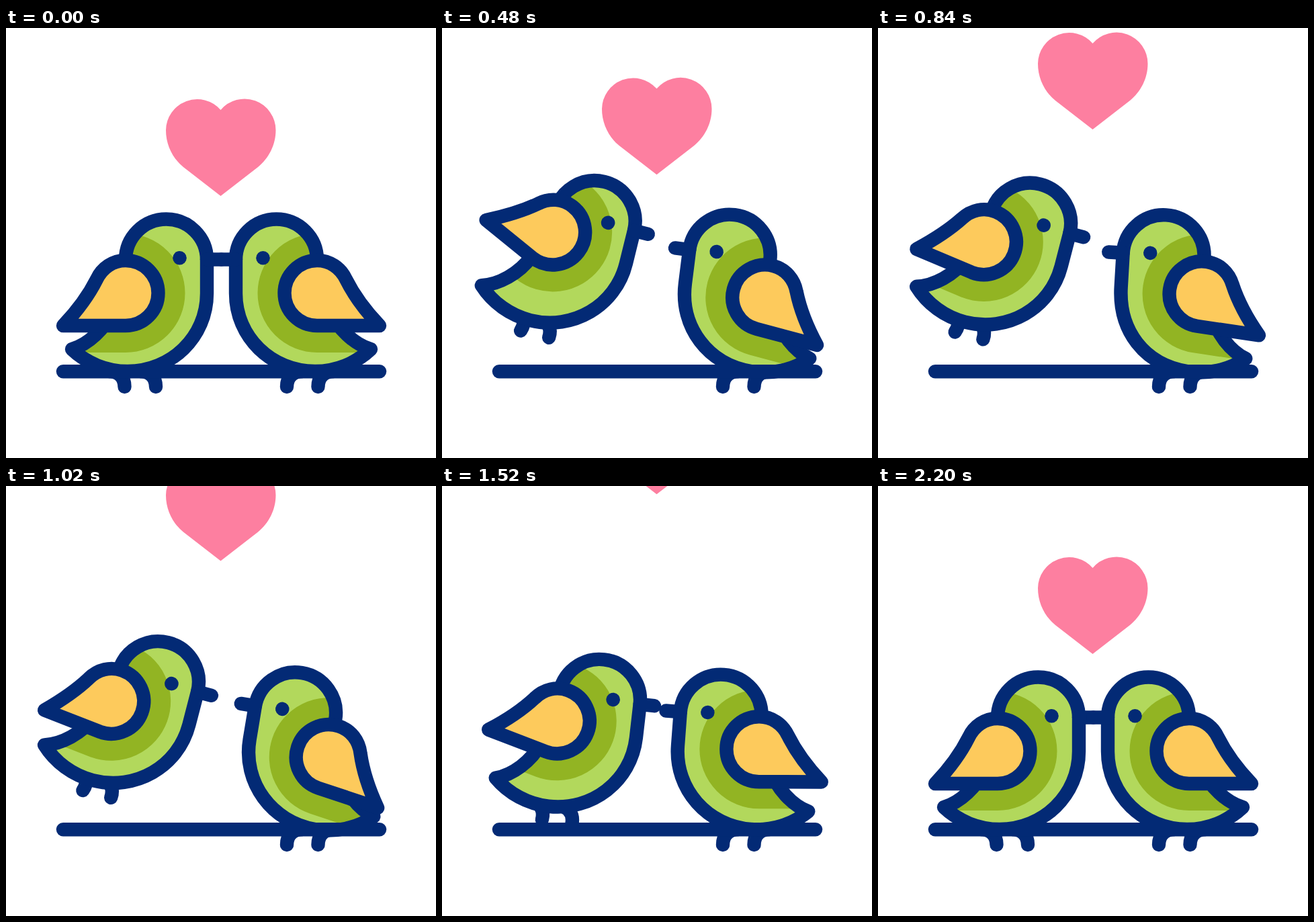
An HTML page for the animation above (2400 ms loop, 640 by 640 pixels).

```html
<!DOCTYPE html>
<html lang="en">
<head>
<meta charset="utf-8">
<title>Two birds</title>
<style>
  html, body { margin: 0; width: 100%; height: 100%; overflow: hidden; background: #fff; }
  svg { display: block; width: 100vw; height: 100vh; }
  .line { fill: none; stroke: #032a75; stroke-width: 20.4; stroke-linecap: round; stroke-linejoin: round; }
  .light { fill: #b2d85c; }
  .shade { fill: #92b423; stroke: #92b423; stroke-width: 80; stroke-linejoin: round; }
  .wing { fill: #fdca5c; }
  .eye { fill: #032a75; }
  .heart { fill: #fd7fa0; }
</style>
</head>
<body>
<svg viewBox="0 0 640 640">
  <defs>
    <path id="heart" d="M319.5 250L264 207C248 194 238 174 238 152A46.5 46.5 0 0 1 319.5 122A46.5 46.5 0 0 1 401.5 152C401.5 174 391 194 375 207Z"/>
  </defs>
  <use id="rising" class="heart" href="#heart"/>
  <use id="growing" class="heart" href="#heart"/>
  <g id="left"></g>
  <g transform="translate(641 0) scale(-1 1)"><g id="right"></g></g>
  <path class="line" d="M85 511.2H556"/>
</svg>
<script>
const LOOP = 2400;
const HIP = [181, 511];
const CORE = [224, 394];
const $ = id => document.getElementById(id);

// Eased value along [time, value] keys
function track(t, keys) {
  if (t <= keys[0][0]) return keys[0][1];
  for (let i = 1; i < keys.length; i++) {
    const [t0, a] = keys[i - 1], [t1, b] = keys[i];
    if (t < t1) {
      const u = (t - t0) / (t1 - t0);
      return a + (b - a) * u * u * (3 - 2 * u);
    }
  }
  return keys[keys.length - 1][1];
}

const turn = (deg, [x, y]) => `rotate(${deg} ${x} ${y})`;

// The upper body tilts round the core, the lower body stays put
function bodyPath(tilt) {
  const a = tilt * Math.PI / 180, c = Math.cos(a), s = Math.sin(a);
  const up = (x, y) => {
    const dx = x - CORE[0], dy = y - CORE[1];
    return `${CORE[0] + dx * c - dy * s} ${CORE[1] + dx * s + dy * c}`;
  };
  return `M98 478C122 471 148 448 160 418L178 390L${up(178, 345)}` +
    `A60.5 60.5 0 0 1 ${up(299, 345)}L${up(299, 395)}` +
    `C${up(299, 460)} 246 511 181 511C150 511 120 499 98 478Z`;
}

// The wing tip draws in a little during flight
function wingPath(tuck) {
  const tip = `${85 + 4 * tuck} ${443 - 2 * tuck}`;
  return `M${tip}L178 443A48.5 48.5 0 0 0 178 346C159 346 143 357 135 374C122 400 105 422 ${tip}Z`;
}

function makeBird(name) {
  const root = $(name);
  root.innerHTML = `
    <clipPath id="${name}Clip"><path data-part="body"/></clipPath>
    <g data-part="feet">
      <path class="line" d="M153 511C168 511 176.5 520 176.5 534"/>
      <path class="line" d="M199.5 511C214.5 511 223 520 223 534"/>
    </g>
    <g data-part="torso">
      <path class="light" data-part="body"/>
      <g clip-path="url(#${name}Clip)"><path class="shade" data-part="wing"/></g>
      <path class="line" data-part="body"/>
      <g data-part="head">
        <path class="line" d="M299 344.5H320.5"/>
        <circle class="eye" cx="258.5" cy="342.3" r="10.3"/>
      </g>
      <path class="wing" data-part="wing"/>
      <path class="line" data-part="wing"/>
    </g>`;
  const parts = key => root.querySelectorAll(`[data-part=${key}]`);
  const set = (key, attr, value) => parts(key).forEach(el => el.setAttribute(attr, value));
  const feet = parts('feet')[0].children;
  const fold = (foot, tuck, dx, deg, toe) =>
    foot.setAttribute('transform', `translate(${dx * tuck} ${-4.8 * tuck}) ${turn(deg * tuck, toe)}`);

  return ({ x = 0, y = 0, lean, tilt = 0, flap, tuck = 0 }) => {
    const pose = `translate(${x} ${y}) ${turn(lean, HIP)}`;
    set('torso', 'transform', pose);
    set('feet', 'transform', tuck ? pose : '');
    fold(feet[0], tuck, -6, 20, [176.5, 534]);
    fold(feet[1], tuck, -9.4, 5, [223, 534]);
    set('body', 'd', bodyPath(tilt));
    set('head', 'transform', turn(tilt, CORE));
    set('wing', 'd', wingPath(tuck));
    set('wing', 'transform', turn(flap, CORE));
  };
}

const poseLeft = makeBird('left');
const poseRight = makeBird('right');

function draw(t) {
  const lift = track(t, [[70, 0], [540, 1], [1340, 1], [1680, 0]]);
  const flap = track(t, [[60, 0], [480, 24], [960, 4], [1360, 28], [1680, 0]]);
  poseLeft({
    x: track(t, [[0, 0], [510, -50], [960, -52], [1340, -50], [1680, 0]]),
    y: -lift * (71 + 0.35 * flap),
    lean: 14.5 * lift,
    flap,
    tuck: lift
  });

  poseRight({
    lean: -track(t, [[40, 0], [420, 9.3], [1340, 9.5], [1680, 0]]),
    tilt: track(t, [[420, 0], [680, 15.5], [960, 0]]),
    flap: track(t, [[100, 0], [380, -9], [720, 6.5], [1020, -9], [1360, 13], [1720, -8], [1960, 0]])
  });

  $('rising').setAttribute('transform', `translate(0 ${-track(t, [[90, 0], [1930, 272]])})`);
  const size = track(t, [[1600, 0], [1835, 1]]);
  const drop = track(t, [[1600, 76], [2200, 0]]);
  $('growing').setAttribute('visibility', size > 0 ? 'visible' : 'hidden');
  $('growing').setAttribute('transform',
    `translate(319.5 ${178 + drop}) scale(${size}) translate(-319.5 -178)`);
}

const start = performance.now();
function tick() {
  draw((performance.now() - start) % LOOP);
  requestAnimationFrame(tick);
}
tick();
</script>
</body>
</html>
```
